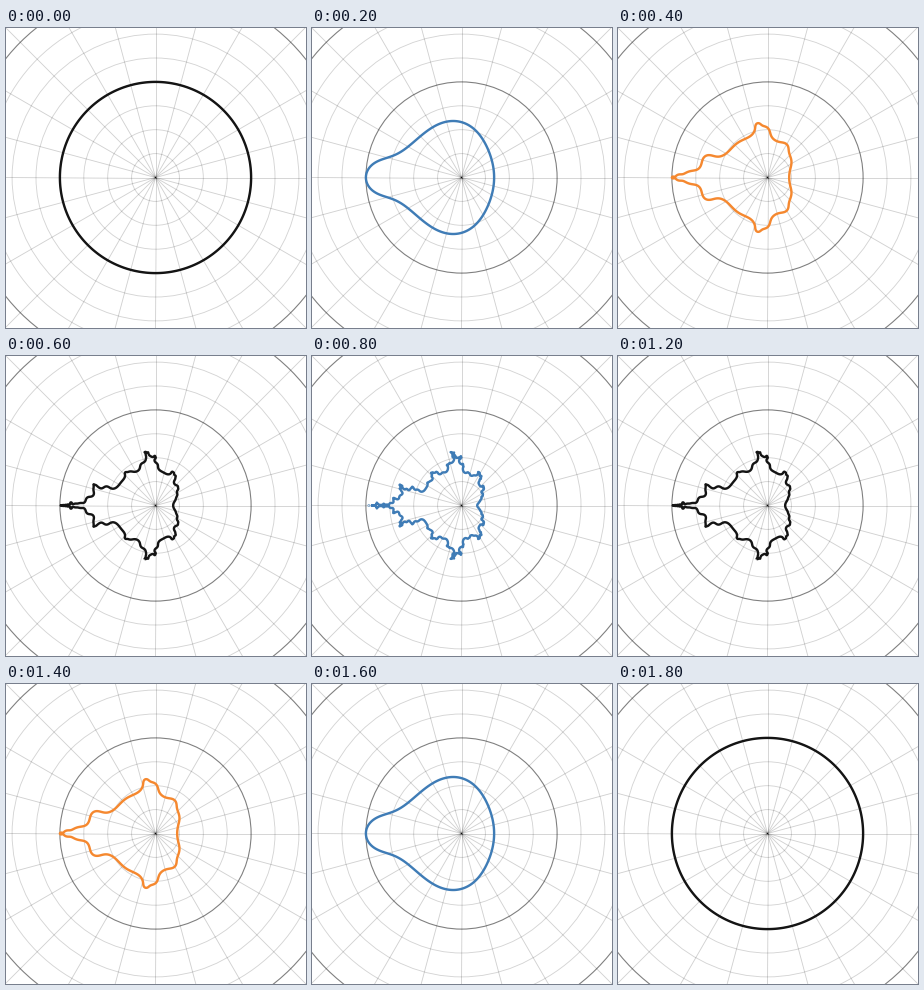
A matplotlib script for the animation above (1.9 s loop, 300 by 300 pixels).

```python
import numpy as np
import matplotlib.pyplot as plt
from matplotlib.animation import FuncAnimation
from matplotlib.patches import Circle

SIZE, DPI = 300, 100
SCALE = 47.8            # pixels per unit of the complex plane
CENTER = 149.5          # pixel position of the origin, from the top left
PX = 72 / DPI           # one pixel in points
LEVELS = 10
COLORS = ["#141414", "#f5882f", "#3f7cb6"]

fig = plt.figure(figsize=(SIZE / DPI, SIZE / DPI), dpi=DPI, facecolor="white")
ax = fig.add_axes([0, 0, 1, 1])
ax.axis("off")


def draw_polar_grid():
    for angle in np.radians(np.arange(0, 360, 15)):
        ax.plot([0, 5 * np.cos(angle)], [0, 5 * np.sin(angle)],
                color="black", alpha=0.18, lw=0.9 * PX, zorder=1)
    for k in range(1, 10):
        major = k % 4 == 0
        ax.add_patch(Circle((0, 0), k / 2, fill=False, ec="black",
                            alpha=0.5 if major else 0.17,
                            lw=(1.1 if major else 0.9) * PX, zorder=1))


def lemniscates():
    """Contours |z_n(c)| = 2 of the iteration z -> z^2 + c."""
    # An even point count keeps the samples off the real axis.
    side = np.linspace(-2.1, 2.1, 526)
    x, y = np.meshgrid(side, side)
    c = x + 1j * y
    z = np.zeros_like(c)
    curves = []
    for n in range(LEVELS):
        z = np.where(np.abs(z) < 1e6, z * z + c, z)
        curve = ax.contour(x, y, np.abs(z), levels=[2],
                           colors=[COLORS[n % 3]], linewidths=2.4 * PX,
                           zorder=3)
        curve.set_visible(False)
        curves.append(curve)
    return curves


draw_polar_grid()
curves = lemniscates()
ax.set_xlim(-CENTER / SCALE, (SIZE - CENTER) / SCALE)
ax.set_ylim(-(SIZE - CENTER) / SCALE, CENTER / SCALE)


def update(frame):
    shown = LEVELS - 1 - abs(LEVELS - 1 - frame)
    for n, curve in enumerate(curves):
        curve.set_visible(n == shown)
    return curves


anim = FuncAnimation(fig, update, frames=2 * LEVELS - 1, interval=100,
                     repeat=True, repeat_delay=0, blit=False)
plt.show()
```
